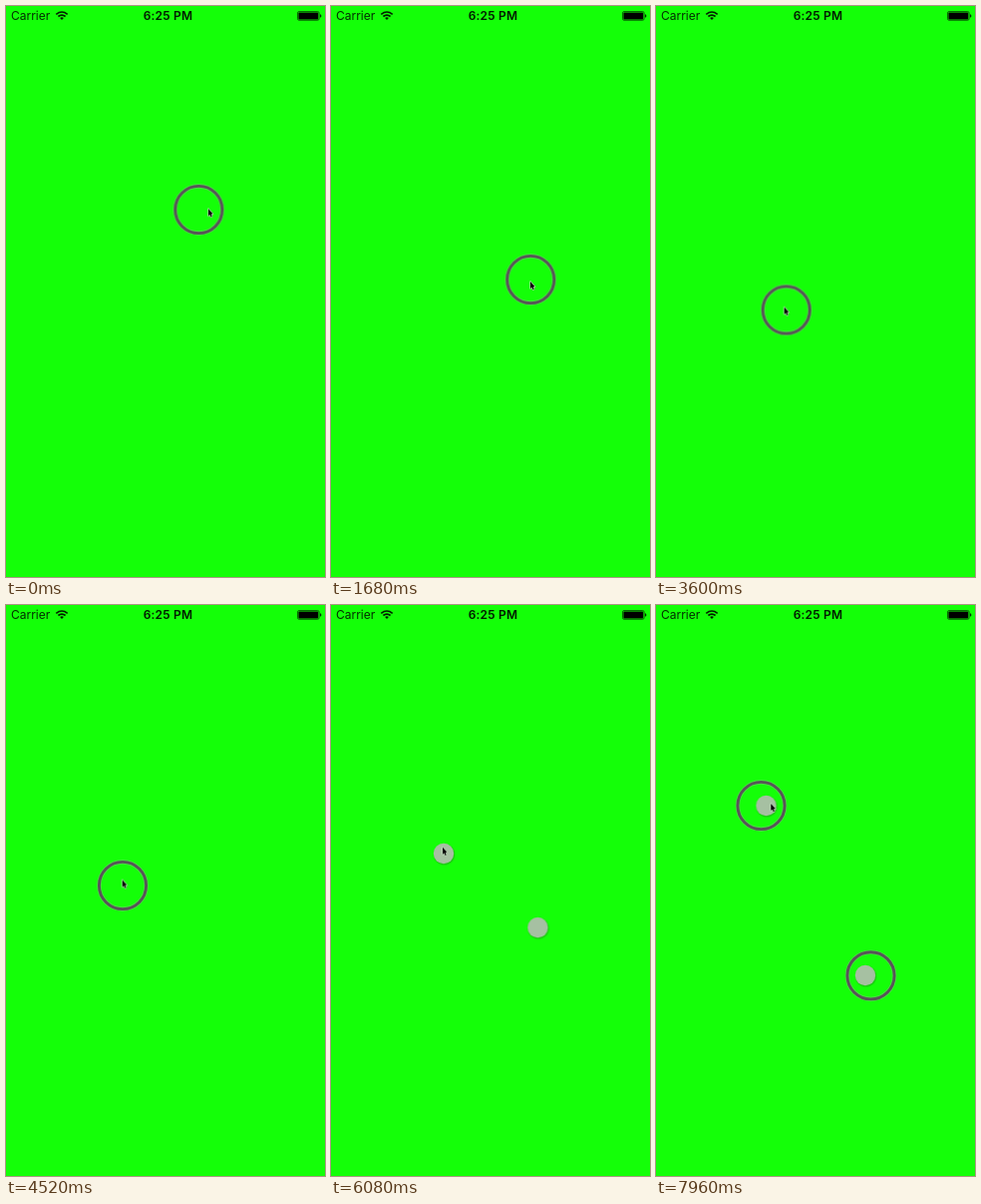
An HTML page for the animation above (8000 ms loop, 320 px wide and 572 px high).

```html
<!DOCTYPE html>
<html lang="en">
<head>
<meta charset="utf-8">
<title>Touch drag</title>
<style>
html, body { margin: 0; width: 100%; height: 100%; overflow: hidden; background: #14ff08; }
svg { display: block; width: 100%; height: 100%; }
text { font: 12px Inter, Roboto, sans-serif; fill: #032d02; }
.time { font-weight: 600; letter-spacing: .2px; fill: #021c01; }

.drag, .cursor, .dot, .pressed, .touch, .pinch { animation: 8s linear infinite; }
.drag { animation-name: drag; }
.cursor { animation-name: cursor; }
.dot { animation-name: dot; }
.touch { animation-name: touch; animation-timing-function: step-end; }
.pinch { animation-name: pinch; animation-timing-function: step-end; }
.pressed { animation-name: pressed; animation-timing-function: step-end; }

@keyframes drag {
  0% { transform: translate(193.3px, 204px); }
  4%, 6% { transform: translate(201.3px, 203.3px); }
  11% { transform: translate(206.5px, 214px); }
  16% { transform: translate(204.3px, 231.5px); }
  18.5% { transform: translate(202.6px, 254px); }
  21% { transform: translate(200.3px, 274px); }
  23.5% { transform: translate(198.3px, 285px); }
  26.5% { transform: translate(195px, 291.7px); }
  31% { transform: translate(187.5px, 307px); }
  35.5% { transform: translate(177.5px, 318px); }
  37% { transform: translate(174.5px, 319.5px); }
  41% { transform: translate(151px, 315.5px); }
  45% { transform: translate(130.7px, 304.5px); }
  47.5% { transform: translate(127px, 301.5px); }
  52% { transform: translate(121px, 292px); }
  56.5% { transform: translate(117px, 281px); }
  58% { transform: translate(116px, 277px); }
  63% { transform: translate(116px, 265px); }
  68%, 100% { transform: translate(116.5px, 259px); }
}
@keyframes cursor {
  0% { transform: translate(203px, 203.2px); }
  4%, 6% { transform: translate(206px, 203.2px); }
  11% { transform: translate(207px, 215px); }
  16% { transform: translate(204px, 235px); }
  18.5% { transform: translate(202px, 259px); }
  21% { transform: translate(200px, 276px); }
  26.5% { transform: translate(194px, 293px); }
  31% { transform: translate(185px, 308px); }
  35.5% { transform: translate(174px, 318.5px); }
  37% { transform: translate(170px, 319.3px); }
  41% { transform: translate(147px, 313px); }
  45% { transform: translate(128.7px, 301.7px); }
  47.5% { transform: translate(126px, 299px); }
  52% { transform: translate(120px, 288px); }
  56.5% { transform: translate(116.7px, 275.5px); }
  63% { transform: translate(116.5px, 262px); }
  68%, 72% { transform: translate(117px, 258px); }
  76% { transform: translate(112px, 242.7px); }
  82% { transform: translate(105.5px, 207px); }
  87%, 93% { transform: translate(105.5px, 200.5px); }
  97% { transform: translate(108.5px, 200px); }
  99.5%, 100% { transform: translate(115.3px, 199px); }
}
@keyframes dot {
  0%, 72% { transform: translate(117px, 259px); }
  76% { transform: translate(113px, 249px); }
  79% { transform: translate(108.5px, 229px); }
  82% { transform: translate(105.5px, 210px); }
  87%, 93% { transform: translate(105.5px, 201px); }
  97% { transform: translate(106.8px, 201px); }
  99.5%, 100% { transform: translate(110.5px, 201px); }
}
@keyframes touch { 0% { opacity: 1; } 68%, 100% { opacity: 0; } }
@keyframes pinch { 0% { opacity: 0; } 72%, 100% { opacity: 1; } }
@keyframes pressed { 0% { opacity: 0; } 90%, 100% { opacity: 1; } }
</style>
</head>
<body>
<svg viewBox="0 0 320 572" preserveAspectRatio="none">
  <defs>
    <g id="ring" fill="none">
      <circle r="23.6" stroke="#9ab39a" stroke-opacity=".4" stroke-width="4.6"/>
      <circle r="23.6" stroke="#585558" stroke-width="2.9"/>
    </g>
    <g id="dot">
      <circle cx=".6" cy=".9" r="10.7" fill="#2d7028" opacity=".35"/>
      <circle r="10.2" fill="#a6c0a2"/>
      <g class="pressed">
        <circle r="11.3" fill="#5cde52"/>
        <circle r="10" fill="#a6d2a0"/>
      </g>
    </g>
  </defs>

  <rect width="320" height="572" fill="#14ff08"/>

  <text x="5" y="14.2">Carrier</text>
  <g fill="none" stroke="#021c01" stroke-width="1.6">
    <path d="M50.3 8.3Q56 3.8 61.7 8.3M52.4 10.5Q56 7.7 59.6 10.5"/>
    <path d="M54.1 11.9Q56 10.5 57.9 11.9L56 14Z" fill="#021c01" stroke="none"/>
  </g>
  <text class="time" x="162.5" y="14.2" text-anchor="middle">6:25 PM</text>
  <rect x="292.5" y="5.5" width="21.6" height="8.8" rx="1.5" fill="none" stroke="#064a03" stroke-width=".8"/>
  <rect x="293.4" y="6.4" width="19.8" height="7" rx=".6"/>
  <path d="M315 8.2Q316.4 8.4 316.4 9.9T315 11.6Z" fill="#032d02"/>

  <g class="touch"><use class="drag" href="#ring"/></g>

  <g class="pinch">
    <g class="dot"><use href="#dot"/></g>
    <g transform="rotate(180 160.2 286)">
      <g class="dot"><use href="#dot" transform="rotate(180)"/></g>
    </g>
  </g>
  <g class="pressed">
    <use href="#ring" x="105.5" y="201"/>
    <use href="#ring" x="215.5" y="371.3"/>
  </g>

  <g class="cursor">
    <path d="M0 0V7L1.5 5.7 2.6 8.2 3.7 7.7 2.7 5.3H4.7Z" stroke="#c4dcc0" stroke-width="1.2" stroke-linejoin="round" paint-order="stroke"/>
  </g>
</svg>
</body>
</html>
```
